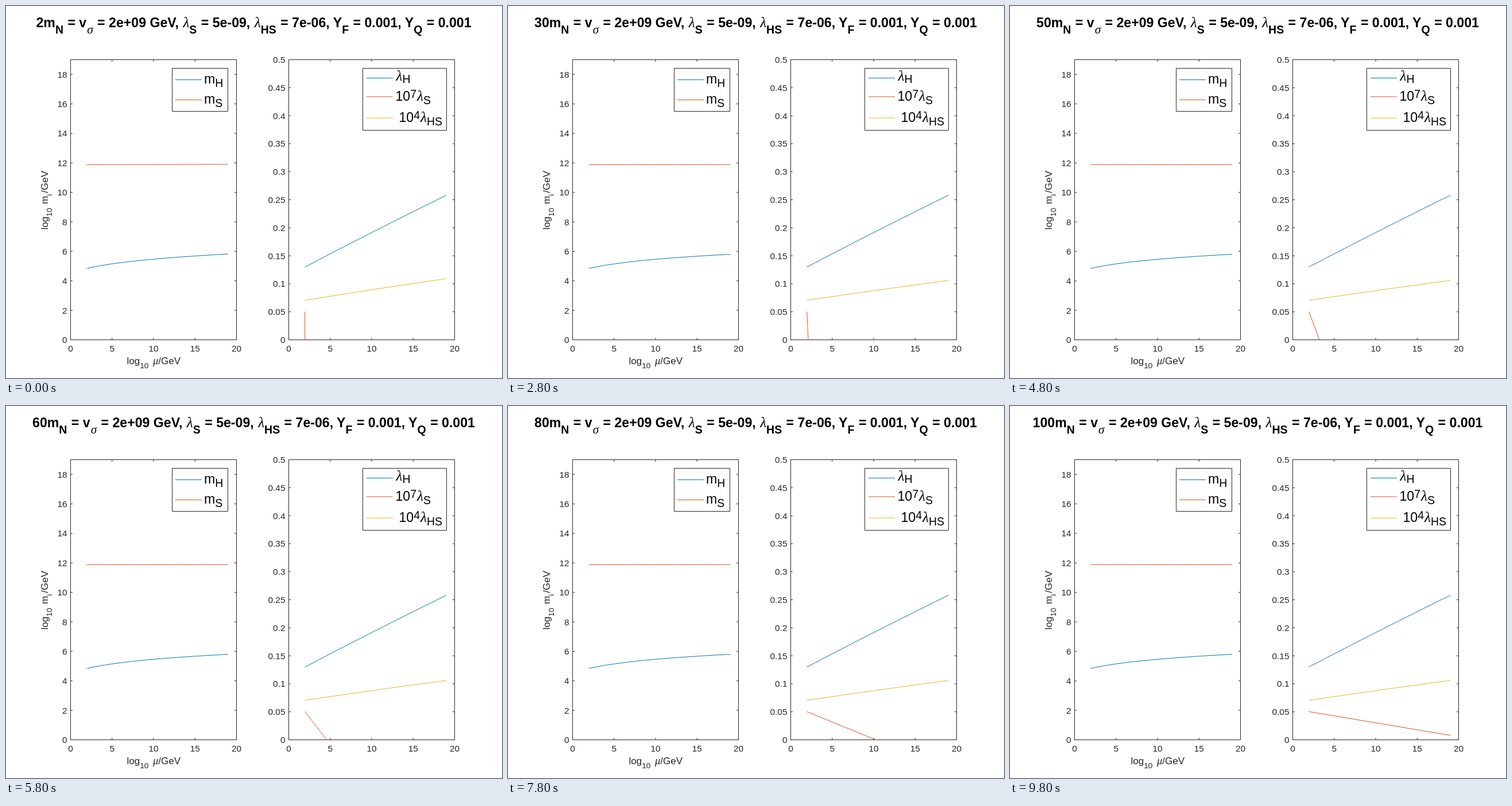
Recreate the animation shown at these times as an HTML page. Size 864 px wide and 648 px high, loop 10000 ms.

```html
<!DOCTYPE html>
<html lang="en">
<head>
<meta charset="utf-8">
<title>Running couplings</title>
<style>
  html, body { margin: 0; width: 100%; height: 100%; overflow: hidden; background: #fff; }
  svg { display: block; width: 864px; height: 648px; }
  text { font-family: "Liberation Sans", Arial, sans-serif; white-space: pre; }
  .symbol { font-family: "Liberation Serif", "Times New Roman", serif; font-style: italic; font-weight: normal; }
</style>
</head>
<body>
<svg id="stage" viewBox="0 0 864 648"></svg>
<script>
const STEP_MS = 200, STEPS = 50;
const INK = '#262626', BLUE = '#0072bd', ORANGE = '#d95319', YELLOW = '#edb120';
const MU_MIN = 1.95, MU_MAX = 19;
const stage = document.getElementById('stage');

function add(parent, tag, attrs, content = '') {
  const node = document.createElementNS('http://www.w3.org/2000/svg', tag);
  for (const key in attrs) node.setAttribute(key, attrs[key]);
  node.textContent = content;
  parent.append(node);
  return node;
}

const line = (d, stroke) => add(stage, 'path', { d, stroke, fill: 'none', 'stroke-width': 1 });
const label = (x, y, size, content, attrs = {}) =>
  add(stage, 'text', { x, y, 'font-size': size, fill: INK, ...attrs }, content);

// Fills a text node from markup with _{sub}, ^{sup} and Greek symbols.
function setRich(node, markup, { size, ratio, drop, rise = 0, gap = 0 }) {
  node.textContent = '';
  let offset = 0;
  for (const [part, mark, script] of markup.matchAll(/([_^])\{(.*?)\}|[λσμ]|[^_^λσμ]+/g)) {
    const content = script || part;
    const target = mark === '_' ? drop : mark === '^' ? -rise : 0;
    const symbol = /[λσμ]/.test(content);
    add(node, 'tspan', {
      dy: target - offset,
      dx: (offset > 0 ? gap : 0) + (symbol ? 1 : 0),
      'font-size': size * (mark ? ratio : 1) * (symbol ? 1.09 : 1),
      class: symbol ? 'symbol' : ''
    }, content);
    offset = target;
  }
}

function rich(x, y, markup, style, attrs) {
  setRich(label(x, y, style.size, '', attrs), markup, style);
}

function makeAxes(left, yMax, yStep) {
  const right = left + 289, top = 93.5, bottom = 581.5;
  const axes = {
    x: v => left + v * 289 / 20,
    y: v => bottom - v * (bottom - top) / yMax
  };
  let d = `M${left} ${top}H${right}V${bottom}H${left}Z`;
  for (let v = 0; v <= 20; v += 5) {
    const x = axes.x(v);
    d += `M${x} ${bottom}v-3.5M${x} ${top}v3.5`;
    label(x, 602, 15.4, v, { 'text-anchor': 'middle' });
  }
  for (let i = 0; i * yStep <= yMax + 1e-9; i++) {
    const v = +(i * yStep).toFixed(2), y = axes.y(v);
    d += `M${left} ${y}h3.5M${right} ${y}h-3.5`;
    label(left - 6, y + 5.5, 15.4, v, { 'text-anchor': 'end' });
  }
  line(d, INK);
  return axes;
}

// Path of f(mu, u), where u runs from 0 to 1 along the curve.
function curve(axes, f) {
  const points = [];
  for (let i = 0; i <= 40; i++) {
    const u = i / 40, mu = MU_MIN + u * (MU_MAX - MU_MIN);
    points.push(axes.x(mu).toFixed(2) + ' ' + axes.y(f(mu, u)).toFixed(2));
  }
  return 'M' + points.join('L');
}

const titleStyle = { size: 23.14, ratio: 0.843, drop: 11, gap: 1 };
const legendStyle = { size: 23.14, ratio: 0.84, drop: 6, rise: 5.5 };
const labelStyle = { size: 17, ratio: 0.8, drop: 7, gap: 2 };

const masses = makeAxes(112.5, 19, 2);
const couplings = makeAxes(492.5, 0.5, 0.05);

rich(210.5, 623.5, 'log_{10} μ/GeV', labelStyle);
rich(0, 0, 'log_{10} m_{i}/GeV', labelStyle, { transform: 'translate(72.5 389.5) rotate(-90)' });

const massH = line('', BLUE), massS = line('', ORANGE);
line(curve(couplings, (mu, u) => 0.13 + 0.128 * u + 0.004 * u * (1 - u)), BLUE);
const lambdaS = line('', ORANGE), lambdaHS = line('', YELLOW);

line('M289.5 108.5H386.5V183.5H289.5Z', INK);
line('M295 128.5H341', BLUE);
line('M295 163.5H341', ORANGE);
rich(345, 135, 'm_{H}', legendStyle, { fill: '#000' });
rich(345, 170, 'm_{S}', legendStyle, { fill: '#000' });

line('M621.5 108.5H767.5V216.5H621.5Z', INK);
line('M628 125.5H674', BLUE);
line('M628 158H674', ORANGE);
line('M628 195H674', YELLOW);
rich(678.5, 130, 'λ_{H}', { ...legendStyle, drop: 4 }, { fill: '#000' });
rich(678.5, 165, '10^{7}λ_{S}', legendStyle, { fill: '#000' });
rich(684.5, 202, '10^{4}λ_{HS}', legendStyle, { fill: '#000' });

const title = label(431.5, 36.5, 23.14, '', { 'text-anchor': 'middle', 'font-weight': 'bold', fill: '#000' });

function draw(ratio) {
  setRich(title, ratio + 'm_{N} = v_{σ} = 2e+09 GeV, λ_{S} = 5e-09, λ_{HS} = 7e-06, ' +
    'Y_{F} = 0.001, Y_{Q} = 0.001', titleStyle);

  const boost = (2 / ratio) ** 2;
  massH.setAttribute('d', curve(masses, (mu, u) =>
    4.84 + 1.49 * Math.log10(1 + (mu - MU_MIN) / 5) + 0.02 * boost * u));
  massS.setAttribute('d', curve(masses, (mu, u) => 11.88 + 0.025 * boost * u));
  lambdaHS.setAttribute('d', curve(couplings, (mu, u) =>
    0.0705 + (0.0355 + 0.0032 * boost) * u + 0.002 * u * (1 - u)));

  // The slope falls with the fourth power of the mass ratio; the line stops at zero.
  const slope = 0.00248 * (100 / ratio) ** 4;
  const end = Math.min(MU_MAX, MU_MIN + 0.0503 / slope);
  const { x, y } = couplings;
  lambdaS.setAttribute('d',
    `M${x(MU_MIN)} ${y(0.0503)}L${x(end)} ${y(0.0503 - slope * (end - MU_MIN))}`);
}

let shown = -1;
function tick() {
  const step = Math.floor(performance.now() / STEP_MS) % STEPS;
  if (step !== shown) draw(2 * (step + 1));
  shown = step;
  requestAnimationFrame(tick);
}
tick();
</script>
</body>
</html>
```
